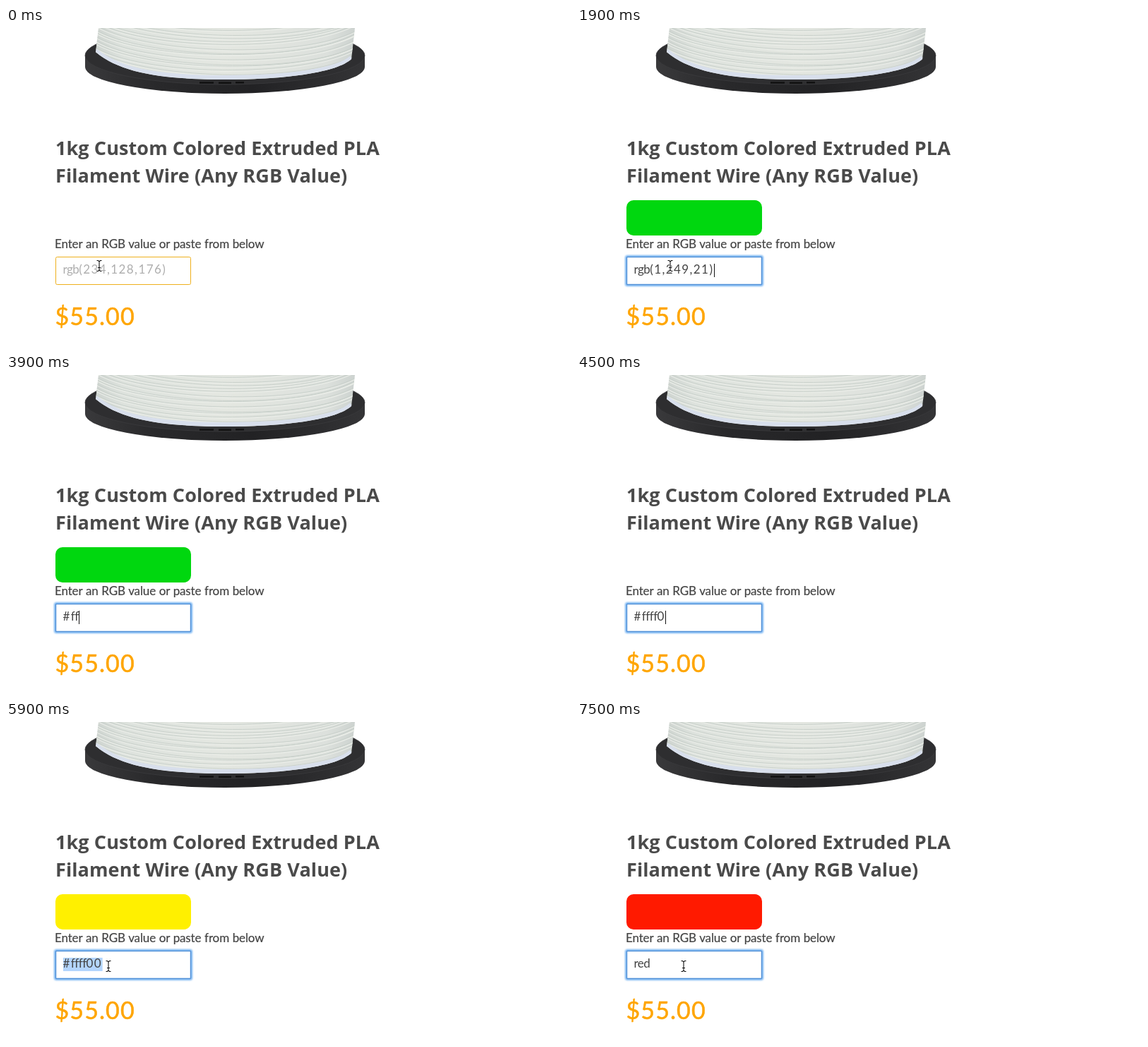
Recreate the animation shown at these times as an HTML page. Size 800 by 452 pixels, loop 7600 ms.

```html
<!DOCTYPE html>
<html lang="en">
<head>
<meta charset="utf-8">
<title>Custom filament colour</title>
<style>
  html, body { margin: 0; width: 100%; height: 100%; overflow: hidden; background: #fff; }
  svg { display: block; width: 800px; height: 452px; }
  .title { font: 700 27px "Open Sans", sans-serif; letter-spacing: .1px; fill: #4a4a4a; }
  .label { font: 400 17px Lato, sans-serif; letter-spacing: -.13px; word-spacing: .5px; fill: #444; stroke: #444; stroke-width: .2; }
  .price { font: 400 34px Lato, sans-serif; letter-spacing: 1.1px; fill: #ffa500; stroke: #ffa500; stroke-width: .5; }
  #value { font: 400 17px Lato, sans-serif; }
  .letters { letter-spacing: -.5px; }
  .signs { letter-spacing: 1.4px; }
</style>
</head>
<body>
<svg viewBox="0 0 800 452">
  <defs>
    <linearGradient id="wound">
      <stop offset="0" stop-color="#ccd2ce"/>
      <stop offset=".12" stop-color="#dde2dd"/>
      <stop offset=".5" stop-color="#e4e7e1"/>
      <stop offset=".88" stop-color="#dce0dc"/>
      <stop offset="1" stop-color="#cbd1ce"/>
    </linearGradient>
    <linearGradient id="rim">
      <stop offset="0" stop-color="#39393b"/>
      <stop offset=".25" stop-color="#29292b"/>
      <stop offset=".6" stop-color="#222224"/>
      <stop offset="1" stop-color="#343436"/>
    </linearGradient>
    <clipPath id="body"><path d="M131 0L127 34C165 66 230 73 312 73C400 73 470 62 489 44L494 0Z"/></clipPath>
    <filter id="soft" x="-10%" y="-30%" width="120%" height="160%"><feGaussianBlur stdDeviation="1.2"/></filter>
  </defs>

  <path d="M112 38V55A198 38 0 0 0 508 55V38Z" fill="url(#rim)"/>
  <ellipse cx="310" cy="39" rx="198" ry="41" fill="#2e2e30" stroke="#3c3c3e" stroke-width=".8"/>
  <path d="M274 77.500h20m7 .2h18m6 -.4h12" stroke="#111" stroke-width="2.500"/>
  <g clip-path="url(#body)">
    <rect x="120" width="380" height="80" fill="url(#wound)"/>
    <g id="strands" fill="none"></g>
  </g>

  <text class="title" x="70" y="180">1kg Custom Colored Extruded PLA</text>
  <text class="title" x="70" y="219">Filament Wire (Any RGB Value)</text>
  <rect id="swatch" x="70" y="244" width="192" height="50" rx="10"/>
  <text class="label" x="69" y="312">Enter an RGB value or paste from below</text>

  <g id="focusRing" fill="none">
    <rect x="69.500" y="323.500" width="193" height="41" rx="2" stroke="#75b3f2" stroke-width="3" filter="url(#soft)"/>
    <rect x="70.500" y="324.500" width="191" height="39" rx="1" fill="#fff" stroke="#5592d8" stroke-width="1.500"/>
  </g>
  <rect id="border" x="70.500" y="324.500" width="191" height="39" rx="2" fill="#fff" stroke="#eeb01c"/>
  <rect id="selection" x="81" y="334" height="19" fill="#b3d5fd"/>
  <text id="value" x="80.500" y="348"></text>
  <path id="squiggle" d="M82 352H104" stroke="#e8432e" stroke-width="2" stroke-linecap="round" stroke-dasharray=".1 3.600"/>
  <rect id="caret" y="334" width="1" height="19" fill="#111"/>
  <text class="price" x="69.500" y="420.500">$55.00</text>

  <g id="pointer" fill="none">
    <path d="M-3.500 -7.500H-1.500L0 -6L1.500 -7.500H3.500M0 -6V6M-3.500 7.500H-1.500L0 6L1.500 7.500H3.500M-2 2.500H2" stroke="#fff" stroke-width="2.600"/>
    <path d="M-3.500 -7.500H-1.500L0 -6L1.500 -7.500H3.500M0 -6V6M-3.500 7.500H-1.500L0 6L1.500 7.500H3.500M-2 2.500H2" stroke="#111" stroke-width="1.100"/>
  </g>
</svg>
<script>
const LOOP = 7600, STEP = 100;
const PLACEHOLDER = 'rgb(234,128,176)';
const GREEN = '#00d70f', YELLOW = '#fff000', RED = '#ff1a00';
const byId = id => document.getElementById(id);
const [swatch, focusRing, border, selection, value, squiggle, caret, pointer] =
  ['swatch', 'focusRing', 'border', 'selection', 'value', 'squiggle', 'caret', 'pointer'].map(byId);

// Each state lasts until the next one begins.
const states = [
  { at: 0, text: '', color: 'none' },
  { at: 400, text: '', color: 'none', focused: true },
  { at: 1600, text: 'rgb(1,249,21)', color: GREEN },
  { at: 2300, text: 'rgb(1,249,21)', color: GREEN, selected: true, misspelt: true },
  { at: 3500, text: '#', color: GREEN },
  { at: 3700, text: '#f', color: GREEN },
  { at: 3800, text: '#ff', color: GREEN },
  { at: 4000, text: '#fff', color: '#fff' },
  { at: 4200, text: '#ffff', color: '#fff' },
  { at: 4400, text: '#ffff0', color: '#fff' },
  { at: 4600, text: '#ffff00', color: YELLOW },
  { at: 5500, text: '#ffff00', color: YELLOW, selected: true },
  { at: 6300, text: 'r', color: YELLOW },
  { at: 6600, text: 're', color: YELLOW },
  { at: 6800, text: 'red', color: RED }
];

// The pointer hides while keys are pressed and returns when the mouse moves.
const pointerSpans = [
  { from: 0, to: 3500, start: [132, 337], end: [132, 337] },
  { from: 4800, to: 6300, start: [145, 346], end: [145, 346] },
  { from: 7200, to: LOOP, start: [149, 346], end: [151, 346] }
];

function drawStrands() {
  let lines = '';
  for (let i = 0; i < 17; i++) {
    const y = -46 + i * 5.1 + Math.sin(i * 2.3), tilt = 6 + Math.sin(i * 1.7) * 3;
    const arc = dy => `M124 ${y + dy}C190 ${y + 42 + dy} 420 ${y + 43 + dy + tilt} 497 ${y + dy + tilt}`;
    lines += `<path d="${arc(0)}" stroke="#c8d0ca" stroke-width=".9"/>` +
             `<path d="${arc(1.8)}" stroke="#e9ece7" stroke-width="1.2"/>`;
  }
  lines += '<path d="M127 32C165 64 230 70 312 70C400 70 470 60 489 42" stroke="#d8dfec" stroke-width="6"/>';
  byId('strands').innerHTML = lines;
}

const show = (element, visible) => element.setAttribute('visibility', visible ? 'visible' : 'hidden');

function setText(text) {
  if (value.dataset.text === text) return;
  value.dataset.text = text;
  value.innerHTML = text.replace(/[a-z]+|[^a-z]+/g, run =>
    `<tspan class="${/[a-z]/.test(run) ? 'letters' : 'signs'}">${run}</tspan>`);
}

function drawPointer(time) {
  const span = pointerSpans.find(s => time >= s.from && time < s.to);
  show(pointer, span);
  if (!span) return;
  const progress = Math.min(1, (time - span.from) / 200);
  const [x, y] = span.start.map((v, i) => v + (span.end[i] - v) * progress);
  pointer.setAttribute('transform', `translate(${x} ${y})`);
}

function draw(time) {
  const state = states.findLast(s => s.at <= time);
  const focused = time >= states[1].at;
  setText(state.text || PLACEHOLDER);
  value.setAttribute('fill', state.text ? '#444' : '#aeaeae');
  swatch.setAttribute('fill', state.color);
  show(focusRing, focused);
  show(border, !focused);
  show(selection, state.selected);
  show(squiggle, state.misspelt);
  const textWidth = state.text ? value.getComputedTextLength() : 0;
  selection.setAttribute('width', textWidth);
  caret.setAttribute('x', Math.round(81 + textWidth));
  show(caret, focused && !state.selected && (time - state.at) % 1000 < 500);
  drawPointer(time);
}

function tick() {
  draw(Math.floor(performance.now() % LOOP / STEP) * STEP);
  requestAnimationFrame(tick);
}

drawStrands();
tick();
</script>
</body>
</html>
```
